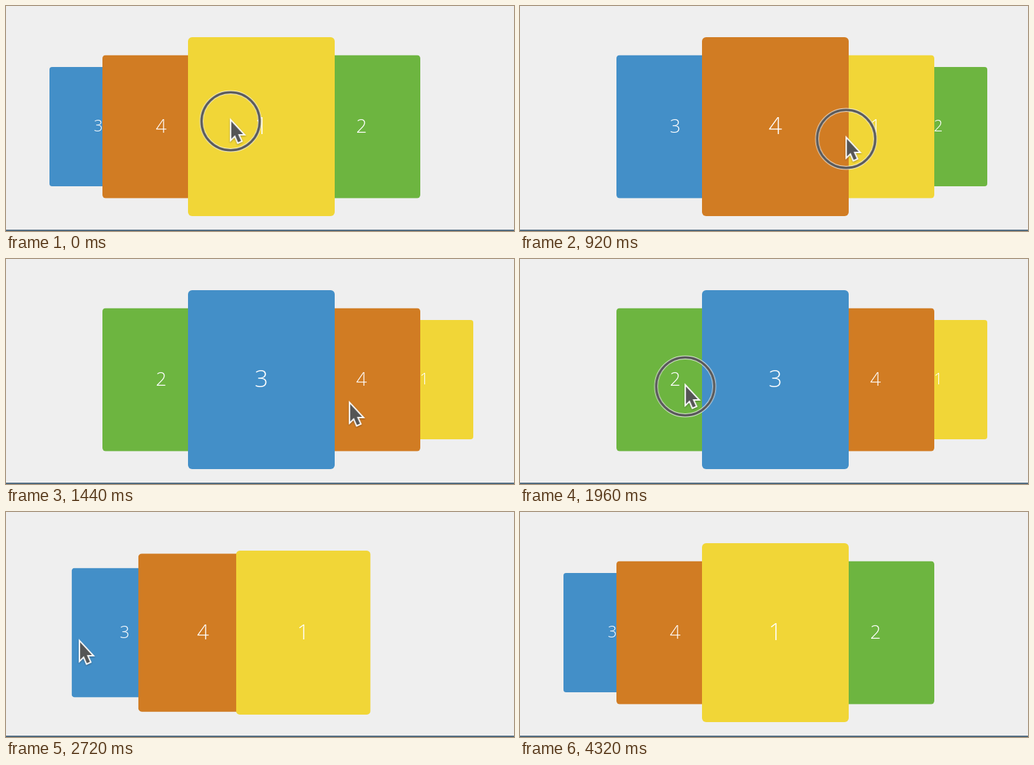
Write an HTML page that moves like this. It is 748 px wide and 332 px high and loops after 4360 ms.

```html
<!DOCTYPE html>
<html lang="en">
<head>
<meta charset="utf-8">
<title>Card carousel</title>
<style>
  :root {
    --far-left: translateX(-240px) scale(.667);
    --left: translateX(-147.6px) scale(.8);
    --center: translateX(0px) scale(1);
    --right: translateX(147.6px) scale(.8);
    --far-right: translateX(240px) scale(.667);
  }
  html, body { margin: 0; width: 100%; height: 100%; overflow: hidden; background: #efefef; }
  .stage { position: relative; width: 748px; height: 332px; overflow: hidden; }
  .line { position: absolute; left: 0; top: 330px; width: 100%; height: 2px; background: #506b80; }

  .card {
    position: absolute; left: 268px; top: 46px; width: 216px; height: 264px;
    border-radius: 6px; color: #fff; text-align: center;
    font: 300 35px/260px "Open Sans", "Noto Sans", sans-serif;
    animation: 4.36s ease infinite;
  }
  .card span { animation: inherit; }
  .one { background: #f1d637; animation-name: one; }
  .two { background: #6db540; animation-name: two; }
  .three { background: #438fc8; animation-name: three; }
  .four { background: #d17c23; animation-name: four; }
  .card span { animation-name: none; }

  /* Two swipes to the right, then two back to the left. */
  @keyframes one {
    0%, 5.505% { transform: var(--center); z-index: 90; }
    12.385%, 23.853% { transform: var(--right); z-index: 50; }
    30.734%, 45.413% { transform: var(--far-right); z-index: 10; }
    52.294%, 60.092% { transform: var(--right); z-index: 50; }
    66.972%, 100% { transform: var(--center); z-index: 90; }
  }
  @keyframes two {
    0%, 5.505% { transform: var(--right); z-index: 50; }
    12.385%, 23.853% { transform: var(--far-right); z-index: 10; }
    30.734%, 45.413% { transform: var(--left); z-index: 50; }
    52.294%, 60.092% { transform: var(--far-left); z-index: 10; }
    66.972%, 100% { transform: var(--right); z-index: 50; }
  }
  @keyframes three {
    0%, 5.505% { transform: var(--far-left); z-index: 10; }
    12.385%, 23.853% { transform: var(--left); z-index: 50; }
    30.734%, 45.413% { transform: var(--center); z-index: 90; }
    52.294%, 60.092% { transform: var(--left); z-index: 50; }
    66.972%, 100% { transform: var(--far-left); z-index: 10; }
  }
  @keyframes four {
    0%, 5.505% { transform: var(--left); z-index: 50; }
    12.385%, 23.853% { transform: var(--center); z-index: 90; }
    30.734%, 45.413% { transform: var(--right); z-index: 50; }
    52.294%, 60.092% { transform: var(--center); z-index: 90; }
    66.972%, 100% { transform: var(--left); z-index: 50; }
  }

  .pointer {
    position: absolute; left: 0; top: 0; width: 1px; height: 1px; overflow: visible; z-index: 100;
    animation: move 4.36s linear infinite, show 4.36s step-end infinite;
  }
  .ring { fill: none; animation: press 4.36s step-end infinite; }
  .arrow {
    fill: #555; stroke: #fff; stroke-width: 4; paint-order: stroke;
    filter: drop-shadow(0 1px 1px rgba(0, 0, 0, .35));
  }

  @keyframes move {
    0% { transform: translate(330px, 170px); }
    5.5% { transform: translate(490px, 186px); }
    13.76% { transform: translate(400px, 180px); }
    16.51% { transform: translate(350px, 180px); }
    21.1% { transform: translate(480px, 196px); }
    23.85% { transform: translate(510px, 208px); }
    33.03% { transform: translate(506px, 214px); }
    39% { transform: translate(430px, 190px); }
    44.95% { transform: translate(244px, 188px); }
    45.87% { transform: translate(220px, 188px); }
    53.67% { transform: translate(380px, 190px); }
    60.09% { transform: translate(140px, 190px); }
    62.39% { transform: translate(108px, 192px); }
    68.8% { transform: translate(150px, 230px); }
    77.98% { transform: translate(200px, 350px); }
    82.57% { transform: translate(520px, 350px); }
    89.9% { transform: translate(508px, 250px); }
    96.33%, 100% { transform: translate(486px, 173px); }
  }
  @keyframes show {
    0% { visibility: visible; }
    98.8%, 100% { visibility: hidden; }
  }
  @keyframes press {
    0%, 16.51%, 39%, 53.67% { opacity: 1; }
    5.505%, 23.853%, 45.413%, 60.092%, 100% { opacity: 0; }
  }
</style>
</head>
<body>
<div class="stage">
  <div class="card three">3</div>
  <div class="card four">4</div>
  <div class="card one">1</div>
  <div class="card two">2</div>
  <div class="line"></div>
  <svg class="pointer">
    <g class="ring">
      <circle r="42.8" stroke="#fff" stroke-opacity=".8" stroke-width="5.4"/>
      <circle r="42.8" stroke="#5a5a5a" stroke-width="3.6"/>
    </g>
    <path class="arrow" d="M1 0V26L6.5 20.5L11 31L15.5 29L11 19H18.5Z"/>
  </svg>
</div>
</body>
</html>
```
